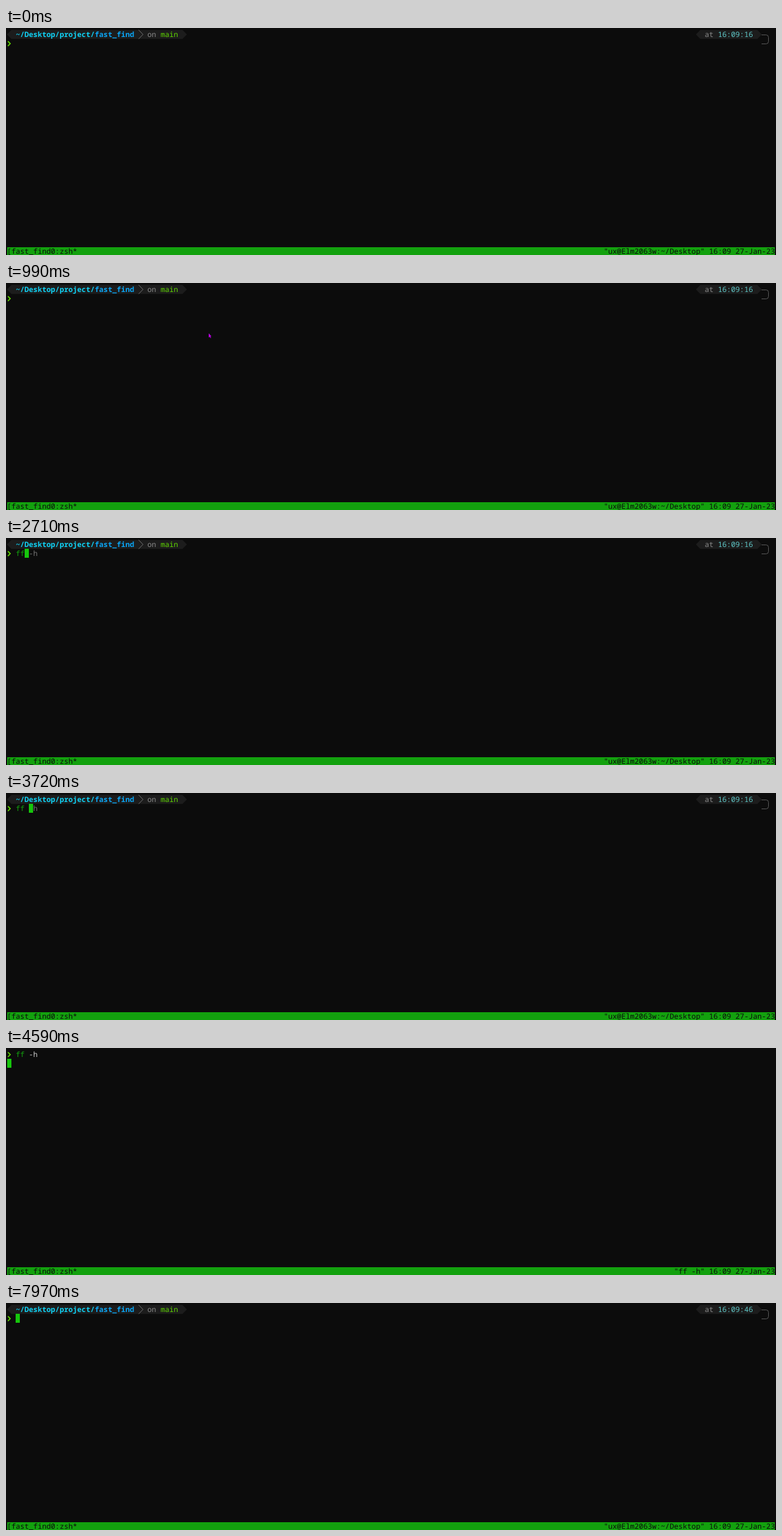
These frames come from a looping animation (1280 by 379 pixels, 8000 ms). An HTML page with a canvas:

```html
<!DOCTYPE html>
<html lang="en">
<head>
<meta charset="utf-8">
<title>Terminal</title>
<style>
  html, body { margin: 0; width: 100%; height: 100%; overflow: hidden; background: #0c0c0c; }
  canvas { display: block; }
</style>
</head>
<body>
<canvas id="stage" width="1280" height="379"></canvas>
<script>
const ctx = document.getElementById('stage').getContext('2d');
const LOOP = 8000, CELL_W = 7.295, CELL_H = 15.1, LEFT = 1.6, TOP = 3.2, COLS = 175;
const FONT = '12.16px "Noto Sans Mono", "DejaVu Sans Mono", monospace';
const C = {
  back: '#0c0c0c', text: '#cccccc', green: '#13a10e', cursor: '#16c60c', lime: '#5fd700',
  grey: '#767676', label: '#8a8a8a', segment: '#1c1c1c', line: '#5c5c5c',
  cyan: '#0fd2f5', blue: '#0aa5f5', teal: '#5fc8c8', red: '#e74856', pointer: '#bc00e6'
};
const HELP = `/home/ux/Desktop/project/fast_find/src/include/config/config.h (line:62) [INFO] :
NAME
    ff - fast file name pattern matching.

USAGE
    ff <Pattern> <RootPath>

OPTIONS
    -p, --pattern, $0
        File pattern that you are searching for.

    -r, --root, $1
        Root directory that file matching searched.

    -v, --version
        Display version information and exit.  No other output is generated.

    -h, --help
        Display help text and exit. No other output generated.`.split('\n');

// Start time and number of typed characters of the command
const COMMAND = 'ff -h';
const KEYS = [2510, 2710, 3720, 3930, 4260];
const CLICK = 1260, ENTER = 4590, OUTPUT = 4660, CLEAR = 7970;

const colX = col => LEFT + col * CELL_W;
const rowY = row => TOP + row * CELL_H;

function write(text, col, row, color, bold) {
  ctx.font = (bold ? 'bold ' : '') + FONT;
  ctx.fillStyle = color;
  [...text].forEach((ch, i) => {
    if (ch !== ' ') ctx.fillText(ch, colX(col + i), rowY(row) + 11.8);
  });
}

function trace(points) {
  ctx.beginPath();
  points.forEach(([x, y]) => ctx.lineTo(x, y));
}

function fill(points, color) {
  trace(points);
  ctx.fillStyle = color;
  ctx.fill();
}

function stroke(points, color, width) {
  trace(points);
  ctx.strokeStyle = color;
  ctx.lineWidth = width;
  ctx.stroke();
}

function segment(first, last, row) {
  const y = rowY(row), mid = y + CELL_H / 2, end = y + CELL_H;
  fill([[colX(first), mid], [colX(first + 1), y], [colX(last), y],
        [colX(last + 1), mid], [colX(last), end], [colX(first + 1), end]], C.segment);
}

function cursor(col, row) {
  ctx.fillStyle = C.cursor;
  ctx.fillRect(Math.round(colX(col)), Math.round(rowY(row)), 7, 15);
}

function arrow(row) {
  const y = rowY(row) + 7.8;
  stroke([[3.2, y - 4], [7, y], [3.2, y + 4]], C.lime, 1.8);
}

function prompt(row, clock) {
  const y = rowY(row);
  segment(0, 40, row);
  write('~/Desktop/project/', 2, row, C.cyan, true);
  write('fast_find', 20, row, C.blue, true);
  stroke([[colX(30), y], [colX(31), y + CELL_H / 2], [colX(30), y + CELL_H]], C.grey, 1);
  write('on', 32, row, C.label);
  write('main', 35, row, C.lime);

  segment(157, 171, row);
  write('at', 159, row, C.label);
  write(clock, 162, row, C.teal);

  const top = Math.floor(y + 8.4) + 0.5, x = 1267.5;
  ctx.beginPath();
  ctx.moveTo(1256, top);
  ctx.arcTo(x, top, x, top + 8, 4);
  ctx.arcTo(x, top + 15, 1256, top + 15, 4);
  ctx.lineTo(1256, top + 15);
  ctx.strokeStyle = C.line;
  ctx.lineWidth = 1;
  ctx.stroke();
  arrow(row + 1);
}

function command(typed, row) {
  write(COMMAND.slice(0, Math.min(typed, 2)), 2, row, typed < 2 ? C.red : C.green);
  if (typed > 3) write(COMMAND.slice(3, typed), 5, row, C.text);
  if (typed) write(COMMAND.slice(typed), 2 + typed, row, C.grey);
}

function statusBar(title) {
  ctx.fillStyle = C.green;
  ctx.fillRect(2, 366, 1276, 13);
  write('[fast_find0:zsh*', 0, 24, C.back);
  const right = `"${title}" 16:09 27-Jan-23`;
  write(right, COLS - right.length, 24, C.back);
}

function pointer(t) {
  if (t < 330 || t >= 2310) return;
  const step = Math.min(1, Math.floor((t - 330) / 66) / 10);
  const left = (1 - step) ** 2;
  const x = Math.round(336.5 + 805 * left), y = Math.round(84 + 258 * left);
  fill([[x, y], [x + 4.5, y + 5], [x + 2.8, y + 5.2], [x + 4, y + 7.5],
        [x + 2.8, y + 8], [x + 1.8, y + 5.8], [x, y + 7]], C.pointer);
}

function draw(t) {
  ctx.fillStyle = C.back;
  ctx.fillRect(0, 0, 1280, 379);
  const running = t >= ENTER && t < OUTPUT;
  statusBar(running ? 'ff -h' : 'ux@Elm2063w:~/Desktop');

  if (t < ENTER) {
    const typed = KEYS.filter(time => t >= time).length;
    prompt(0, '16:09:16');
    command(typed, 1);
    if (t >= CLICK) cursor(2 + typed, 1);
    pointer(t);
  } else if (t < CLEAR) {
    arrow(0);
    command(COMMAND.length, 0);
    if (running) return cursor(0, 1);
    HELP.forEach((line, i) => write(line, 0, i + 1, C.text));
    prompt(21, '16:09:46');
    cursor(2, 22);
  } else {
    prompt(0, '16:09:46');
    cursor(2, 1);
  }
}

ctx.textRendering = 'geometricPrecision';
const start = performance.now();
function tick() {
  draw((performance.now() - start) % LOOP);
  requestAnimationFrame(tick);
}
tick();
</script>
</body>
</html>
```
